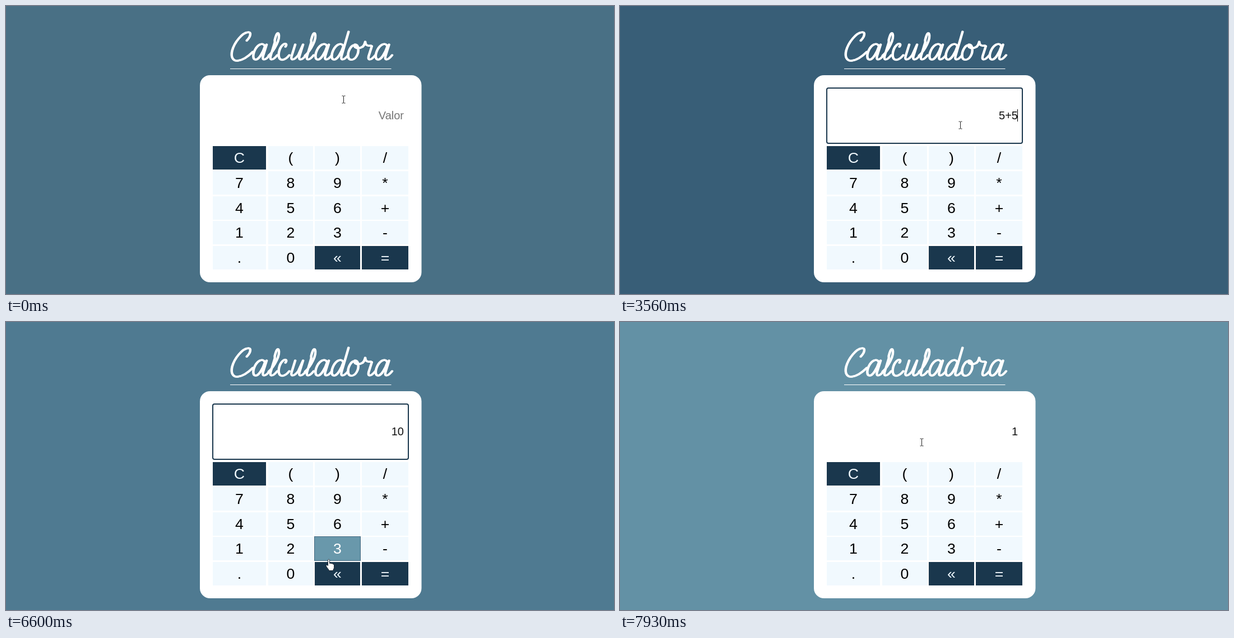
An HTML page for the animation above (8 s loop, 1085 by 516 pixels).

```html
<!DOCTYPE html>
<html lang="pt">
<head>
<meta charset="utf-8">
<title>Calculadora</title>
<style>
  html, body { margin: 0; width: 100%; height: 100%; overflow: hidden; }
  svg { display: block; width: 1085px; height: 516px; }
  text { font-family: "Liberation Sans", Arial, sans-serif; }
  #keys text { font-size: 26.67px; text-anchor: middle; }
  #value { font-size: 20px; text-anchor: end; }
  #title path { fill: none; stroke: #fff; stroke-width: 3.3; stroke-linecap: round; stroke-linejoin: round; }
</style>
</head>
<body>
<svg id="stage" viewBox="0 0 1085 516">
  <g id="title" role="img" aria-label="Calculadora"></g>
  <rect x="400" y="112" width="287.5" height="1" fill="#fff"/>
  <rect x="346" y="124" width="395.5" height="371" rx="18" fill="#fff"/>
  <rect id="focus" x="369" y="147" width="349" height="99" rx="3" fill="none" stroke="#1a374d" stroke-width="2"/>
  <text id="value" x="710" y="203"></text>
  <rect id="caret" x="709" y="185" width="1" height="22"/>
  <g id="keys"></g>
  <circle id="click" r="10" fill="#fdfa80"/>
  <g id="cursor">
    <path id="beam" d="M-3-6.5h2L0-6 1-6.5h2M-3 6.5h2L0 6l1 .5h2M0-6V6" fill="none" stroke="#222"/>
    <path id="hand" d="M-2 1.5C-2-.7 1-.7 1 1.5V7l2-.5 1 1 2-.3 1 1.2 2 .6V14c0 3-2 4-2 6H0c0-2-4-5-5-8-1-2 1-3 3-1z" fill="#fff" stroke="#1b2733"/>
    <path id="arrow" d="M0 0v16l4-3.5 2.5 6 2.5-1-2.5-6h5z" fill="#fff" stroke="#000"/>
  </g>
</svg>
<script>
const LOOP = 8000, FOCUS = 1545, BLUR = 6810, BLINK = 545;
const $ = id => document.getElementById(id);
const lerp = (a, b, p) => a + (b - a) * p;
const mix = (a, b, p) => `rgb(${a.map((v, i) => lerp(v, b[i], p).toFixed(1))})`;

function add(parent, tag, attrs) {
  const el = document.createElementNS('http://www.w3.org/2000/svg', tag);
  for (const name in attrs) el.setAttribute(name, attrs[name]);
  return parent.appendChild(el);
}

// Script lettering from shared strokes: a round bowl and a slanted stem with an exit hook
const bowl = 'M21-26C17-32 9-28 4-19C-1-9 0-1 5-1C11-1 18-14 22-26';
const stem = (x, h) => `${x + h * .27} ${-h}L${x + 1}-7C${x - 1} 2 ${x + 6} 0 ${x + 13}-9`;
const glyphs = {
  C: ['M29-35C36-42 38-51 31-50C21-49 7-32 3-17C0-5 5 2 13 1C23 0 32-7 40-15', 40],
  a: [bowl + 'M' + stem(17, 28), 29],
  l: ['M-1-8C10-18 20-38 17-47C15-52 12-44 10-36L' + stem(1.5, 32), 17],
  c: ['M12-24C16-29 12-32 7-27C0-20-1-9 1-4C4 2 12 0 19-9', 20],
  u: ['M' + stem(2, 28) + 'L' + stem(16, 28), 28],
  d: [bowl + 'M' + stem(17, 51), 29],
  o: ['M12-27C5-26 0-14 1-7C2 2 11 1 16-7C21-15 20-28 13-28C11-22 18-19 27-24', 24.5],
  r: ['M2-24C5-26 6-29 7-33C7-27 11-25 17-26L' + stem(12, 25), 25]
};
let penX = 400;
for (const letter of 'Calculadora') {
  const [d, advance] = glyphs[letter];
  for (const nib of [0, 1.2]) add($('title'), 'path', { d, transform: `translate(${penX + nib} 97)` });
  penX += advance;
}

// Keypad
const navy = [26, 55, 77], steel = [64, 104, 130], teal = [105, 152, 171];
const pale = [241, 249, 254], black = [0, 0, 0], white = [255, 255, 255];
const columns = [[369, 464], [468, 548], [551, 632], [635, 718]];
const keys = [...'C()/789*456+123-.0«='].map((label, i) => {
  const [x, right] = columns[i % 4], w = right - x;
  const y = Math.round(251 + 44.8 * Math.floor(i / 4)), h = 42;
  const face = add($('keys'), 'rect', { x, y, width: w, height: h });
  const edge = add($('keys'), 'rect', { x: x - .5, y: y - .5, width: w + 1, height: h + 1, fill: 'none', stroke: mix(steel, steel, 0) });
  const text = add($('keys'), 'text', { x: x + w / 2, y: y + 30 });
  text.textContent = label;
  return { x, y, w, h, face, edge, text, dark: 'C«='.includes(label) };
});
const inside = (k, [x, y]) => x > k.x && x < k.x + k.w && y > k.y && y < k.y + k.h;

// Mouse stops: arrival, x, y and, where it rests, departure
const stops = [
  [0, 602, 167, 70], [500, 697, 190], [1050, 488, 207], [1440, 585, 202, 1650],
  [1950, 607, 213, 4380], [4460, 609, 210, 5270], [5720, 466, 215], [6060, 532, 242],
  [6320, 513, 329], [6670, 592, 449, 6950], [7230, 625, 380], [7580, 600, 312],
  [7760, 530, 272], [7930, 538, 215, LOOP]
];
function mouse(t) {
  const i = stops.findLastIndex(s => s[0] <= t);
  const [arrive, x, y, leave = arrive] = stops[i];
  if (t <= leave) return [x, y];
  const [next, nx, ny] = stops[i + 1], p = (t - leave) / (next - leave);
  return [lerp(x, nx, p), lerp(y, ny, p)];
}

// Hover reacts slightly late, then fades out
function hoverLevel(key, t) {
  for (let age = 0; age < 70; age += 10)
    if (inside(key, mouse(Math.max(0, t - 35 - age)))) return 1 - age / 70;
  return 0;
}

// CSS "ease": cubic-bezier(.25, .1, .25, 1)
function ease(x) {
  let lo = 0, hi = 1, s;
  for (let i = 0; i < 20; i++) {
    s = (lo + hi) / 2;
    if (.75 * s * (1 - s) ** 2 + .75 * s * s * (1 - s) + s ** 3 < x) lo = s; else hi = s;
  }
  return .3 * s * (1 - s) ** 2 + 3 * s * s * (1 - s) + s ** 3;
}
function backdrop(t) {
  if (t < 1550) return mix(teal, navy, ease((t + 515) / 2065));
  if (t < 5650) return mix(navy, steel, ease((t - 1550) / 4100));
  return mix(steel, teal, ease((t - 5650) / 4100));
}

const show = (el, on) => { el.style.display = on ? '' : 'none'; };
const entries = [[0, 'Valor'], [2650, '5'], [3280, '5+'], [3560, '5+5'], [4860, '10'], [6880, '1']];

function render(t) {
  $('stage').style.background = backdrop(t);

  const [edited, entry] = entries.findLast(e => e[0] <= t);
  const focused = t >= FOCUS && t < BLUR;
  const blinks = Math.floor((t - Math.max(FOCUS, edited)) / BLINK);
  $('value').textContent = entry;
  $('value').setAttribute('fill', entry === 'Valor' ? '#757575' : '#111');
  show($('focus'), focused);
  show($('caret'), focused && blinks % 2 === 0);

  for (const key of keys) {
    const level = hoverLevel(key, t);
    key.face.setAttribute('fill', mix(key.dark ? navy : pale, teal, level));
    key.edge.setAttribute('stroke-opacity', level);
    key.text.setAttribute('fill', mix(key.dark ? pale : black, white, level));
  }

  const [x, y] = mouse(t).map(v => Math.round(v) + .5);
  const onKey = keys.some(k => inside(k, [x, y]));
  const onDisplay = x > 368 && x < 719 && y > 146 && y < 247;
  $('cursor').setAttribute('transform', `translate(${x} ${y})`);
  show($('hand'), onKey);
  show($('beam'), onDisplay);
  show($('arrow'), !onKey && !onDisplay);
  $('click').setAttribute('cx', x - 2);
  $('click').setAttribute('cy', y);
  show($('click'), [1440, BLUR].some(press => t >= press && t < press + 140));
}

function frame() {
  render(performance.now() % LOOP);
  requestAnimationFrame(frame);
}
frame();
</script>
</body>
</html>
```
